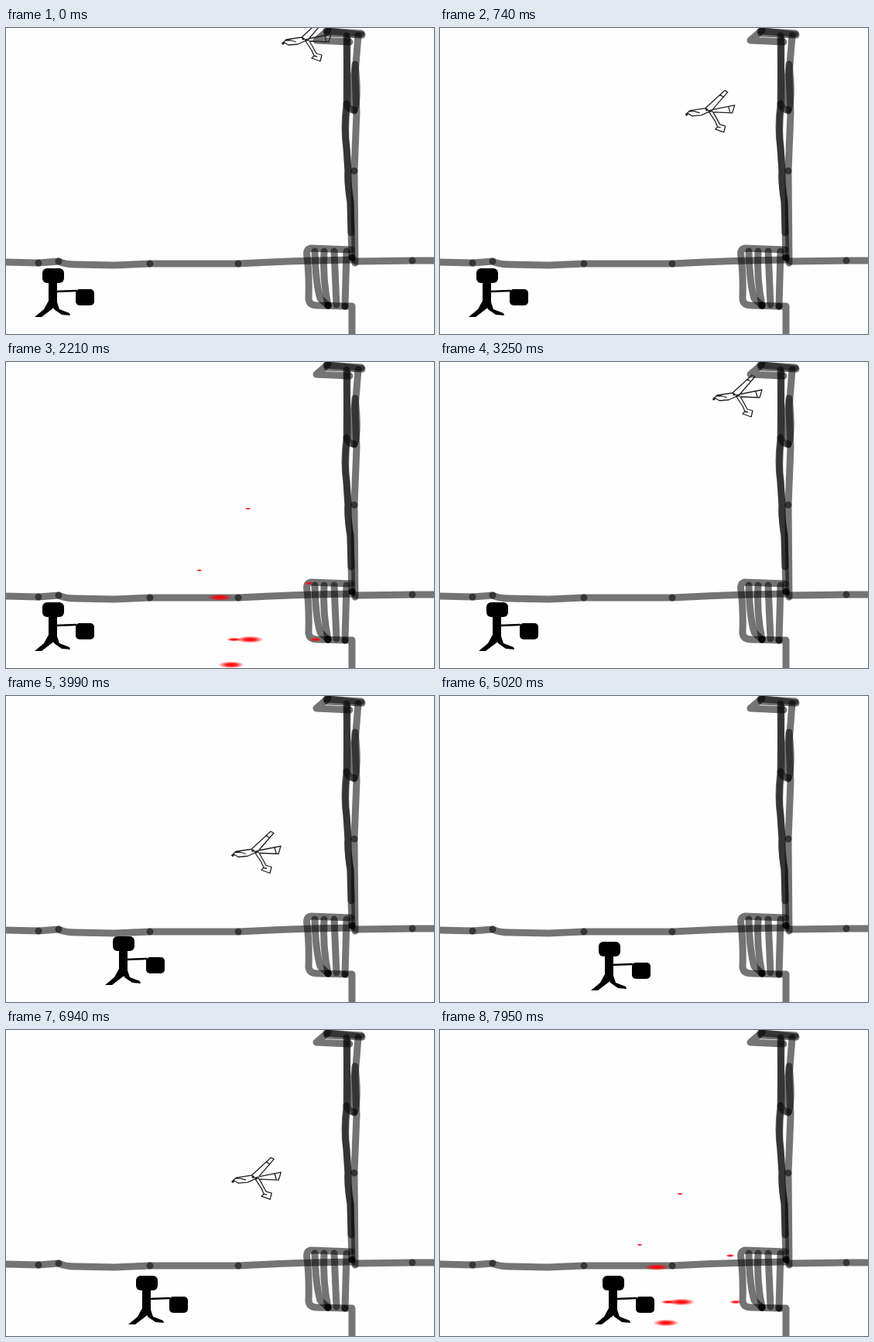
An HTML page that plays this animation: 553 by 396 pixels, repeating every 8000 ms.

```html
<!DOCTYPE html>
<html lang="en">
<head>
<meta charset="utf-8">
<style>
  html, body { margin: 0; width: 100%; height: 100%; overflow: hidden; background: #fefefe; }
  svg { display: block; width: 553px; height: 396px; }
  #scenery path { fill: none; stroke: #000; stroke-opacity: .54; stroke-width: 9; stroke-linecap: round; stroke-linejoin: round; }
</style>
</head>
<body>
<svg viewBox="0 0 553 396">
  <defs>
    <radialGradient id="blood">
      <stop offset="0" stop-color="#f00"/>
      <stop offset=".4" stop-color="#f00" stop-opacity=".85"/>
      <stop offset="1" stop-color="#f00" stop-opacity="0"/>
    </radialGradient>
  </defs>
  <g id="scenery">
    <!-- ground, with darker joints where strokes meet -->
    <path d="M-5 303L42 304"/>
    <path d="M42 304L68 302"/>
    <path d="M68 302Q76 306 90 306L140 307L186 305"/>
    <path d="M186 305L300 305"/>
    <path d="M300 305Q370 301 447 300"/>
    <path d="M452 302L525 301"/>
    <path d="M525 301L560 301"/>
    <!-- pole -->
    <path d="M440 10L441 98Q437 130 440 155L442 185Q441 200 445 225L447 297"/>
    <path d="M440 98Q436 130 440 155L442 185Q441 200 445 225L446 265" stroke-width="7"/>
    <path d="M455 10L451 60L453 110L450 185"/>
    <path d="M450 185L451 304"/>
    <path d="M451 47Q447 75 450 107Q456 90 451 47" stroke-width="7"/>
    <path d="M441 14L440 98Q442 106 450 106" stroke-width="6"/>
    <!-- arm of the pole -->
    <path d="M416 4L460 9L415 7" stroke-width="8"/>
    <path d="M414 4L459 7" stroke-width="7"/>
    <path d="M416 3L401 16L444 18" stroke-width="8"/>
    <!-- grate -->
    <path d="M446 287L394 285Q387 286 389 296Q392 320 391 351Q392 359 402 359L438 360"/>
    <path d="M399 289Q400 330 406 350L416 359" stroke-width="8"/>
    <path d="M411 289Q409 325 416 359" stroke-width="8"/>
    <path d="M424 289L427 358" stroke-width="8"/>
    <path d="M440 289L438 360" stroke-width="8"/>
    <path d="M416 359h.1M447 297h.1"/>
    <path d="M416 359h.1M447 297h.1"/>
    <path d="M438 360L447 360L447 400"/>
  </g>
  <g id="splat" fill="url(#blood)"></g>
  <g id="bird" fill="none" stroke="#222" stroke-width="1.3" stroke-linejoin="round">
    <path d="M0 0L5 -5L25 -8L31 -4L20 1L8 2L3 -1ZM4 -4L11 -4L18 -2M25 -8L50 -31L54 -29L35 -7M44 -26L49 -22M33 -6L58 -11L63 -12L60 -2L36 -3M55 -10L57 -3M30 -3L38 9L41 16L38 19L49 23L51 15L44 13L38 2L33 -6M41 16L45 17"/>
    <path d="M0 -1L2 1M26 -7L28 -5M31 -6L32 -3" stroke-width="3"/>
  </g>
  <g id="person">
    <rect x="10" y="0" width="28" height="19" rx="6"/>
    <rect x="18" y="19" width="11" height="26"/>
    <path d="M18 42L29 42L26 50L9 63L0 63L12 53ZM22 42L29 44L32 53L45 58L46 61L35 60L25 53Z"/>
    <path d="M28 30L54 29" stroke="#000" stroke-width="2.5"/>
    <rect x="53" y="27" width="24" height="21" rx="5"/>
  </g>
</svg>
<script>
const LOOP = 8000, STEP = 147.2;
const [splat, bird, person] = ["splat", "bird", "person"].map(id => document.getElementById(id));

// Keys are [step, x, y]
const walk = [[21, 37, 311], [22, 50, 311], [27, 128, 311], [29, 303, 318], [34, 195, 318],
  [37, 138, 318], [38, 123, 318], [43, 123, 318], [45, 139, 318], [47, 158, 318], [51, 200, 318]];

// A fall starts at x, y with speed vx, vy and gains g per step
const falls = [
  { from: 0, to: 10, start: 2, x: 357, y: 20, vx: -13.1, vy: 21.4, g: 3.08 },
  { from: 22, to: 29, start: 22, x: 353, y: 48, vx: -12.2, vy: 16.9, g: 2.95 },
  { from: 43, to: 52, start: 43, x: 345, y: 45, vx: -13.2, vy: 27, g: 2.7 }
];

const splats = [[10, 17], [52, 60]];
const origin = [297, 318];
const drops = [[310, 212, 4, 1.5], [258, 278, 4, 1.5], [375, 292, 6, 2], [280, 307, 16, 4],
  [382, 352, 8, 2.5], [312, 352, 18, 4.5], [295, 352, 10, 2.5], [292, 379, 17, 4.5]];

const dots = drops.map(([, , rx, ry]) => {
  const dot = document.createElementNS("http://www.w3.org/2000/svg", "ellipse");
  dot.setAttribute("rx", rx);
  dot.setAttribute("ry", ry);
  return splat.appendChild(dot);
});

const place = (node, x, y) => node.setAttribute("transform", `translate(${x} ${y})`);
const show = (node, on) => node.setAttribute("visibility", on ? "visible" : "hidden");

function along(keys, step) {
  const next = keys.findIndex(key => key[0] > step);
  if (next === 0) return keys[0].slice(1);
  if (next < 0) return keys[keys.length - 1].slice(1);
  const a = keys[next - 1], b = keys[next];
  const u = (step - a[0]) / (b[0] - a[0]);
  return [a[1] + (b[1] - a[1]) * u, a[2] + (b[2] - a[2]) * u];
}

function draw(now) {
  const step = Math.floor((now % LOOP + 4) / STEP);
  place(person, ...along(walk, step));

  const fall = falls.find(f => step >= f.from && step < f.to);
  show(bird, fall);
  if (fall) {
    const n = Math.max(0, step - fall.start);
    place(bird, fall.x + fall.vx * n, fall.y + fall.vy * n + fall.g * n * n);
  }

  const burst = splats.find(([from, to]) => step >= from && step < to);
  show(splat, burst);
  if (burst) {
    const spread = 1.245 * (1 - Math.exp(-.65 * (step - burst[0] + .5)));
    drops.forEach(([x, y], i) =>
      place(dots[i], origin[0] + (x - origin[0]) * spread, origin[1] + (y - origin[1]) * spread));
  }
}

const begin = performance.now();
function tick() {
  draw(performance.now() - begin);
  requestAnimationFrame(tick);
}
tick();
</script>
</body>
</html>
```
